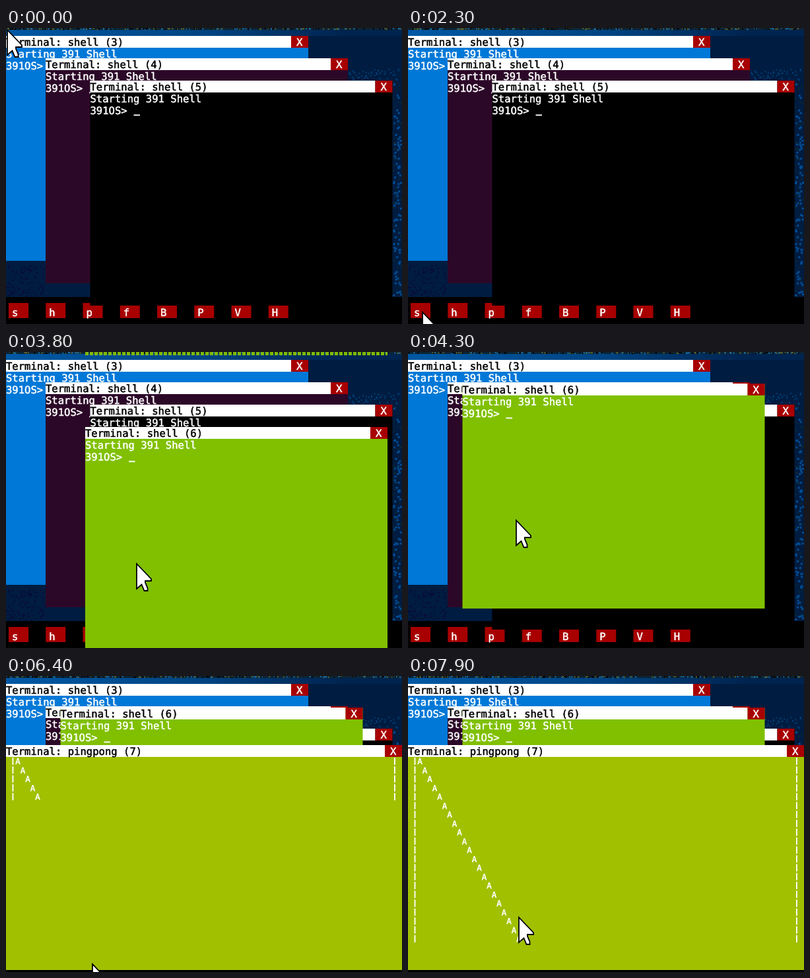
Recreate the animation shown at these times as an HTML page. Size 600 by 450 pixels, loop 8 s.

```html
<!DOCTYPE html>
<html lang="en">
<head>
<meta charset="utf-8">
<title>Desktop terminals</title>
<style>
  html, body { margin: 0; width: 100%; height: 100%; overflow: hidden; background: #000; }
  svg { display: block; width: 600px; height: 450px; }
  text {
    font: 15.57px "DejaVu Sans Mono", "Liberation Mono", monospace;
    white-space: pre; text-rendering: geometricPrecision;
    fill: #fff; stroke: #fff; stroke-width: .5px;
  }
  .title { fill: #000; stroke: #000; }
  .small { font-size: 12.46px; }
</style>
</head>
<body>
<svg id="stage" viewBox="0 0 600 450">
  <defs>
    <linearGradient id="sky">
      <stop offset="0" stop-color="#0058a4"/>
      <stop offset=".5" stop-color="#004482"/>
      <stop offset=".85" stop-color="#002450"/>
    </linearGradient>
  </defs>
</svg>
<script>
const LOOP = 8000, STEP = 100;
const SHELL_W = 458, WIN_H = 342, BAR_H = 18, CLOSE_W = 26;
const DRAG_START = 3800, DRAG_END = 4250, SHELL_OPEN = 2500, PONG_OPEN = 5900;
const ROW_H = 13.5, ROW_TIME = 93.75, ICON_GAP = 56.25;
const RED = '#a80000';
const stage = document.getElementById('stage');

function add(parent, tag, attrs, text = '') {
  const node = document.createElementNS('http://www.w3.org/2000/svg', tag);
  for (const key in attrs) node.setAttribute(key, attrs[key]);
  node.textContent = text;
  parent.appendChild(node);
  return node;
}

const rect = (parent, x, y, width, height, fill) =>
  add(parent, 'rect', { x, y, width, height, fill });

const label = (parent, x, y, text, cls = '') =>
  add(parent, 'text', { x, y, class: cls }, text);

function random(seed) {
  let s = seed * 7919 + 17;
  const next = () => (s = (s * 16807) % 2147483647) / 2147483647;
  next();
  return next;
}

// Path of small blocks scattered over a box.
function specks(seed, count, { x, y, w, h }, size = 2) {
  const rnd = random(seed);
  let d = '';
  for (let i = 0; i < count; i++) {
    const px = x + rnd() * (w - size), py = y + rnd() * (h - size);
    d += `M${px.toFixed(1)} ${py.toFixed(1)}h${size}v${size}h${-size}z`;
  }
  return d;
}

function windowFrame(x, y, width, color, title) {
  const g = add(stage, 'g', { transform: `translate(${x} ${y})` });
  rect(g, 0, 0, width, WIN_H, color);
  rect(g, 0, 0, width - CLOSE_W, BAR_H, '#fff');
  rect(g, width - CLOSE_W, 0, CLOSE_W, BAR_H, RED);
  label(g, 0, 15, `Terminal: ${title}`, 'title');
  label(g, width - 18, 15, 'X');
  return g;
}

function shell(x, y, color, id) {
  const g = windowFrame(x, y, SHELL_W, color, `shell (${id})`);
  label(g, 0, 33, 'Starting 391 Shell');
  label(g, 0, 51, '391OS>');
  rect(g, 66, 51.5, 9.5, 1.9, '#fff');
  return g;
}

// Wallpaper
const rightEdge = { x: 586, y: 80, w: 14, h: 329 };
rect(stage, 0, 0, 600, 409, '#001c40');
rect(stage, 0, 0, 600, 12, 'url(#sky)');
add(stage, 'path', { fill: '#0a0a38', d: specks(2, 110, { x: 0, y: 360, w: 60, h: 49 }) });
add(stage, 'path', { fill: '#004078', d: specks(3, 50, { x: 518, y: 62, w: 82, h: 18 }) });
add(stage, 'path', { fill: '#004c94', d: specks(4, 90, rightEdge, 3) });
add(stage, 'path', { fill: '#102c30', d: specks(5, 50, rightEdge) });

// Flickering strip along the top edge
const strip = { x: 0, y: 0, w: 600, h: 3 };
rect(stage, 0, 0, 600, 3, '#0c2434');
const glitch = ['#5c6428', '#1870a8', '#000'].map(fill => add(stage, 'path', { fill }));

// Taskbar icons lie under the windows, their letters above
rect(stage, 0, 409, 600, 41, '#000');
const icons = [...'shpfBPVH'];
icons.forEach((_, i) => rect(stage, 4 + i * ICON_GAP, 418, 30, 23, RED));

shell(0, 12, '#0078d7', 3);
shell(60, 46, '#2c0828', 4);
shell(127.5, 80, '#000', 5);
icons.forEach((letter, i) => label(stage, 9 + i * ICON_GAP, 438, letter));

const dragged = shell(120, 114, '#80c000', 6);
const wrapped = add(stage, 'path', {
  d: 'M120 2.5H578', stroke: '#80b800', 'stroke-width': 5, 'stroke-dasharray': '5 2'
});

const pong = windowFrame(0, 105, 600, '#a0c000', 'pingpong (7)');
rect(pong, 0, WIN_H, 600, 3, '#000');
const rows = Array.from({ length: 22 }, (_, k) => {
  const row = add(pong, 'g', { transform: `translate(0 ${BAR_H + k * ROW_H})` });
  for (const x of [9.5, 588]) rect(row, x, 1, 1.9, 11, '#fff');
  label(row, 14.3 + k * 7.5, 11, 'A', 'small');
  return row;
});

const pointer = add(stage, 'path', {
  d: 'M0 0V38L7.5 31.5L11.5 41H16.5V37L13 28.5V26H22V23Z',
  fill: '#fff', stroke: '#000', 'stroke-width': 1.8
});

const home = { x: 2, y: 3 };
const moves = [
  { from: 900, to: 2100, x: 22, y: 432 },
  { from: 2700, to: 3600, x: 198, y: 322 },
  { from: DRAG_START, to: DRAG_END, x: 164, y: 256 },
  { from: 4600, to: 5500, x: 131, y: 438 },
  { from: 6900, to: 7800, x: 168, y: 367 }
];

function ease(t, from, to) {
  const u = Math.min(1, Math.max(0, (t - from) / (to - from)));
  return u * u * (3 - 2 * u);
}

const mix = (a, b, k) => a + (b - a) * k;
const place = (node, x, y) => node.setAttribute('transform', `translate(${x} ${y})`);
const show = (node, on) => node.setAttribute('display', on ? 'inline' : 'none');

function draw(t) {
  let { x, y } = home;
  for (const move of moves) {
    const k = ease(t, move.from, move.to);
    x = mix(x, move.x, k);
    y = mix(y, move.y, k);
  }
  place(pointer, x, y);

  const drag = ease(t, DRAG_START, DRAG_END);
  const top = mix(114, 48, drag);
  place(dragged, mix(120, 82.5, drag), top);
  show(dragged, t >= SHELL_OPEN);
  show(wrapped, t >= SHELL_OPEN && top + WIN_H > 450);

  show(pong, t >= PONG_OPEN);
  rows.forEach((row, k) => show(row, t >= PONG_OPEN + 20 + (k + 1) * ROW_TIME));
  glitch.forEach((path, i) =>
    path.setAttribute('d', specks(t / STEP * 3 + i + 10, 60, strip)));
}

const start = performance.now();
function tick() {
  const t = (performance.now() - start) % LOOP;
  draw(Math.floor(t / STEP) * STEP);
  requestAnimationFrame(tick);
}
tick();
</script>
</body>
</html>
```
